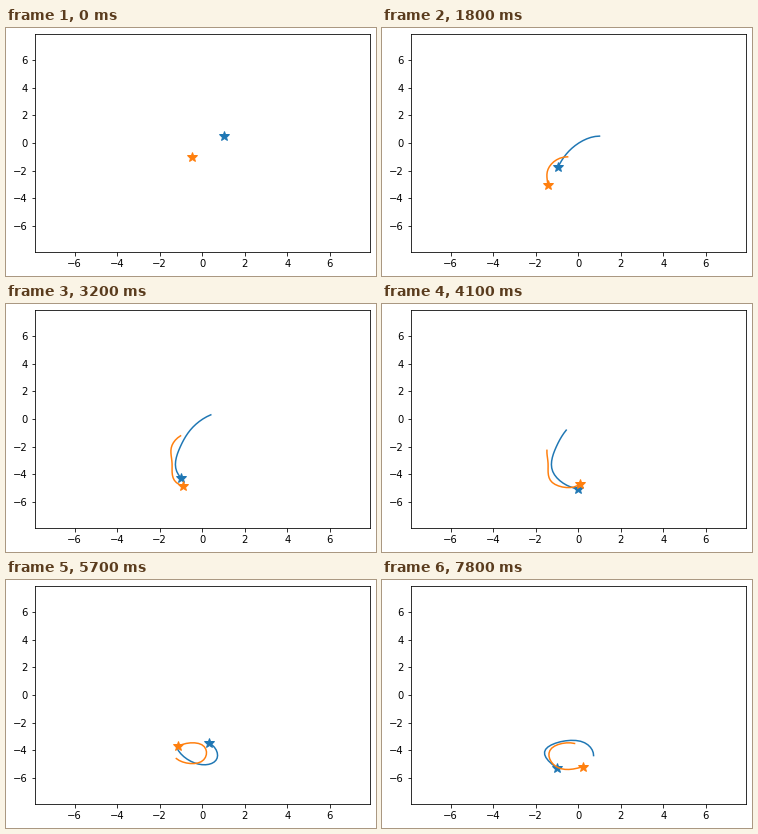
A matplotlib script for the animation above (8000 ms loop, 370 px wide and 248 px high).

```python
import numpy as np
import matplotlib.pyplot as plt
from matplotlib.animation import FuncAnimation

W, H, DPI = 370, 248, 72
TICKS, TICK_MS = 80, 100
STEP_TICKS = 1.4      # one simulation step, in ticks
STEPS = 57
KEY_STEPS = 7         # steps between key points
TRAIL = 20            # steps kept behind each star
LIMIT = 7.875
START_SPEED = (-0.2, 0)

# Both stars fall in from above, then circle the same spot.
BLUE = [(1, 0.5), (-0.3, -0.38), (-1.03, -2), (-1.2, -3.8), (-0.19, -5),
        (0.7, -4.57), (0.11, -3.35), (-1.43, -3.77), (-1.01, -5.27)]
ORANGE = [(-0.5, -1), (-1.42, -1.9), (-1.42, -3.22), (-1.22, -4.6),
          (-0.05, -4.83), (-0.02, -3.6), (-1.25, -3.85), (-1.07, -5.15),
          (0.21, -5.19)]


def spline_path(points):
    """Cubic spline through evenly timed points, one position per step."""
    p = np.array(points, float)
    n = len(p)
    A = 4 * np.eye(n) + np.eye(n, k=1) + np.eye(n, k=-1)
    b = np.zeros_like(p)
    b[1:-1] = 3 * (p[2:] - p[:-2])
    # given speed at the start, parabolic end
    A[0, :2] = 1, 0
    b[0] = np.multiply(START_SPEED, KEY_STEPS)
    A[-1, -2:] = 1, 1
    b[-1] = 2 * (p[-1] - p[-2])
    slope = np.linalg.solve(A, b)

    t = np.arange(STEPS) / KEY_STEPS
    i = np.minimum(t.astype(int), n - 2)
    u = (t - i)[:, None]
    ease = u * u * (3 - 2 * u)
    return (p[i] * (1 - ease) + p[i + 1] * ease
            + slope[i] * u * (1 - u) ** 2
            - slope[i + 1] * u * u * (1 - u))


paths = [spline_path(BLUE), spline_path(ORANGE)]
step_start = np.rint(np.arange(STEPS) * STEP_TICKS)

fig = plt.figure(figsize=(W / DPI, H / DPI), dpi=DPI, facecolor="white")
left, top, width, height = 28.85, 6.3, 334.8, 217.44
ax = fig.add_axes([left / W, 1 - (top + height) / H, width / W, height / H])
ax.set(xlim=(-LIMIT, LIMIT), ylim=(-LIMIT, LIMIT),
       xticks=range(-6, 7, 2), yticks=range(-6, 7, 2))

trails, stars = [], []
for color in ("C0", "C1"):
    trails += ax.plot([], [], color=color)
    stars += ax.plot([], [], "*", color=color, markersize=10)


def draw(tick):
    k = np.searchsorted(step_start, tick, side="right") - 1
    for path, trail, star in zip(paths, trails, stars):
        trail.set_data(*path[max(0, k - TRAIL):k + 1].T)
        star.set_data(*path[k:k + 1].T)
    return trails + stars


anim = FuncAnimation(fig, draw, frames=TICKS, interval=TICK_MS,
                     repeat=True, repeat_delay=0)
plt.show()
```
